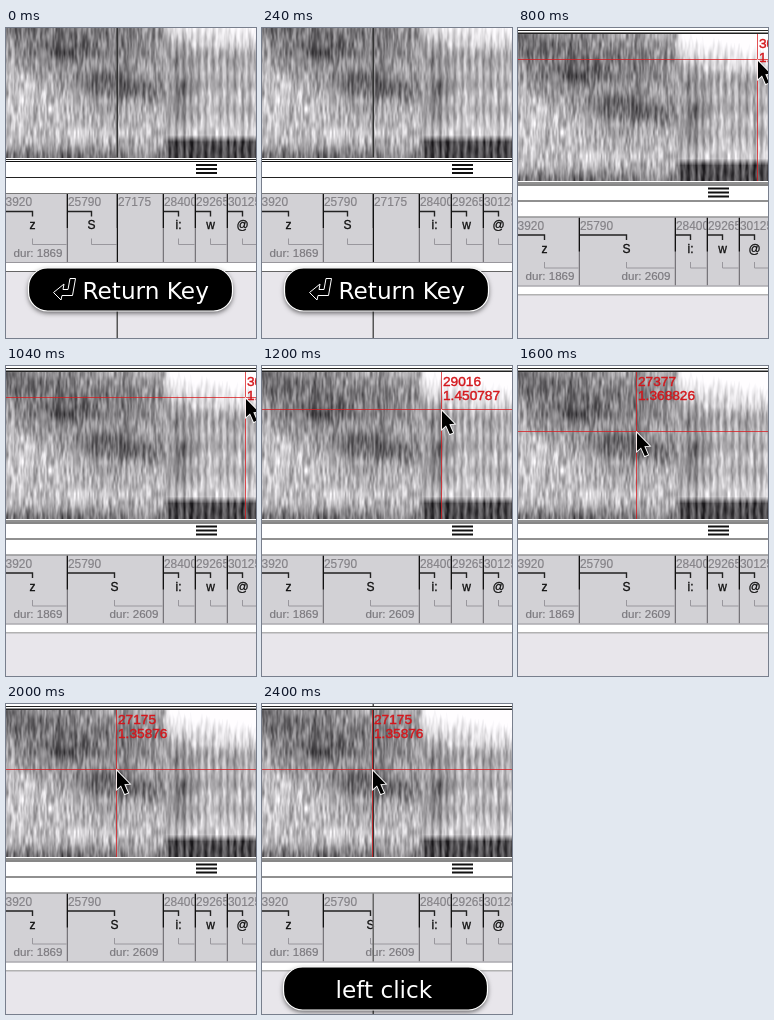
Write an HTML page with a canvas that moves like this. It is 250 by 310 pixels and loops after 2800 ms.

```html
<!DOCTYPE html>
<html lang="en">
<head>
<meta charset="utf-8">
<title>Segment editor</title>
<style>
html, body { margin: 0; width: 250px; height: 310px; overflow: hidden; background: #fff; }
canvas { display: block; }
</style>
</head>
<body>
<canvas id="stage" width="250" height="310"></canvas>
<script>
const W = 250, H = 310, STEP = 400;
const SPEC_TOP = 6, SPEC_BOTTOM = 153;
const SCROLL = -23.5;
const SANS = '"Liberation Sans", Arial, sans-serif';
const ctx = document.getElementById('stage').getContext('2d');

const STEPS = [
  { split: true, line: true, banner: { x: 22.5, y: 240, text: 'Return Key', textX: 78, icon: true } },
  { split: true, line: true },
  { pointer: [239, 31], info: ['30640', '1.532'] },
  { pointer: [179, 43], info: ['29016', '1.450787'] },
  { pointer: [118, 65], info: ['27377', '1.368826'] },
  { pointer: [110, 65], info: ['27175', '1.35876'] },
  { pointer: [110, 65], info: ['27175', '1.35876'], line: true,
    banner: { x: 21.5, y: 263, text: 'left click', textX: 75 } }
];

// start, end, sample number, label, duration
const SEGMENTS = [
  [-8.5, 60.5, '23920', 'z', 'dur: 1869'],
  [60.5, 156.5, '25790', 'S', 'dur: 2609'],
  [156.5, 188.5, '28400', 'i:'],
  [188.5, 220.5, '29265', 'w'],
  [220.5, 251.5, '30125', '@']
];
const SPLIT_SEGMENTS = [
  SEGMENTS[0],
  [60.5, 110.5, '25790', 'S'],
  [110.5, 156.5, '27175', ''],
  ...SEGMENTS.slice(2)
];

// Energy clouds: x, y, radius x, radius y, strength
const FRICATIVE = [
  [40, 25, 80, 32, .18], [10, 15, 30, 20, .12], [55, 47, 28, 12, .24],
  [95, 72, 40, 13, .17], [125, 85, 45, 12, .24], [120, 38, 50, 25, .13],
  [60, 153, 130, 10, .25], [25, 98, 35, 24, -.1], [85, 128, 70, 9, -.08]
];
const VOWEL = [
  [172, 52, 14, 20, .18], [175, 85, 15, 15, .3], [220, 54, 48, 14, .16],
  [218, 79, 45, 10, .14], [172, 110, 16, 16, .2], [225, 105, 35, 10, .1]
];

function rect(x, y, w, h, color) {
  ctx.fillStyle = color;
  ctx.fillRect(x, y, w, h);
}

function text(str, x, y, font, color, align = 'left', weight = 0) {
  ctx.font = font;
  ctx.textAlign = align;
  ctx.fillStyle = ctx.strokeStyle = color;
  ctx.fillText(str, x, y);
  if (weight) {
    ctx.lineWidth = weight;
    ctx.strokeText(str, x, y);
  }
}

function polyline(color, width, points) {
  ctx.strokeStyle = color;
  ctx.lineWidth = width;
  ctx.beginPath();
  points.forEach(([x, y]) => ctx.lineTo(x + .5, y + .5));
  ctx.stroke();
}

function hash(x, y) {
  let n = Math.imul(x, 374761393) + Math.imul(y, 668265263);
  n = Math.imul(n ^ (n >>> 13), 1274126177);
  return ((n ^ (n >>> 16)) >>> 0) / 4294967296;
}

function noise(x, y) {
  const ix = Math.floor(x), iy = Math.floor(y);
  const smooth = t => t * t * (3 - 2 * t);
  const mix = (a, b, t) => a + (b - a) * t;
  const u = smooth(x - ix), v = smooth(y - iy);
  return mix(mix(hash(ix, iy), hash(ix + 1, iy), u),
             mix(hash(ix, iy + 1), hash(ix + 1, iy + 1), u), v);
}

function clouds(list, x, y) {
  return list.reduce((sum, [cx, cy, rx, ry, k]) =>
    sum + k * Math.exp(-(((x - cx) / rx) ** 2) - ((y - cy) / ry) ** 2), 0);
}

const ramp = (a, b, v) => Math.min(1, Math.max(0, (v - a) / (b - a)));

function darkness(x, y) {
  const streak = noise(x / 1.8, y / 8) + noise(x / 1.8 + 90.5, y / 11 + 40.5) - 1;
  const grain = noise(x / 1.3 + 300, y / 4) - .5;
  const voiced = ramp(156, 164, x);
  const hiss = .3 + clouds(FRICATIVE, x, y) + streak * .26 + grain * .08;
  const pulse = Math.cos((x - 163) * 2 * Math.PI / 7.3);
  const onset = ramp(8, 36, y - (x - 160) * .16 + streak * 8);
  const tone = onset * (.19 + clouds(VOWEL, x, y) + pulse * .09 + streak * .16 + grain * .06);
  const base = ramp(130, 137, y) * (.52 + pulse * .03);
  return hiss * (1 - voiced) + (tone + base) * voiced;
}

function makeSpectrogram() {
  const canvas = document.createElement('canvas');
  canvas.width = W;
  canvas.height = SPEC_BOTTOM - SPEC_TOP;
  const c = canvas.getContext('2d');
  const image = c.createImageData(canvas.width, canvas.height);
  for (let y = 0, i = 0; y < canvas.height; y++) {
    for (let x = 0; x < W; x++, i += 4) {
      const level = 255 * (1 - Math.min(.9, Math.max(0, darkness(x, y + SPEC_TOP))));
      image.data[i] = level;
      image.data[i + 1] = level - 2;
      image.data[i + 2] = level + 1;
      image.data[i + 3] = 255;
    }
  }
  c.putImageData(image, 0, 0);
  return canvas;
}

const spectrogram = makeSpectrogram();

function drawSegment([left, right, number, label, duration], selected) {
  const middle = Math.floor((left + right) / 2);
  ctx.save();
  ctx.beginPath();
  ctx.rect(left, 189, right - left, 68);
  ctx.clip();
  text(number, left + 1.5, 201, `11.9px ${SANS}`, '#858388', 'left', .2);
  if (duration) text(duration, right - 4, 251.5, `11.6px ${SANS}`, '#7b797e', 'right', .2);
  if (label) {
    polyline('#222', 1.4, [[left, 206], [middle, 206], [middle, 211]]);
    polyline('#99979d', 1, [[middle, 233], [middle, 239], [right, 239]]);
    text(label, middle + .5, 224, `12px ${SANS}`, '#111', 'center', .3);
  }
  rect(left, 189, 1.5, 68, selected ? '#111' : '#77757a');
  rect(left, 189, 1.5, 34, '#111');
  ctx.restore();
}

function drawPanels({ split, line }) {
  rect(0, 154, W, 1, '#222');
  rect(0, 156, W, 1, '#111');
  rect(0, 172, W, 1, '#222');
  for (const y of [159, 163, 167]) rect(190, y, 21, 2, '#111');

  rect(0, 188, W, 70, '#d2d1d5');
  rect(0, 188, W, 1, '#777');
  rect(0, 257, W, 1, '#99979d');
  for (const segment of split ? SPLIT_SEGMENTS : SEGMENTS)
    drawSegment(segment, split && segment[0] === 110.5);

  rect(0, 266, W, 1, '#666');
  rect(0, 267, W, 133, '#e8e6eb');
  if (line) {
    if (!split) rect(110.5, 189, 1.5, 68, '#666');
    rect(110.5, 267, 1.5, 133, '#555');
  }
}

function drawWindow(step) {
  rect(0, 0, W, 400, '#fff');
  rect(0, 2, W, 1, '#222');
  rect(0, 4.5, W, 1.5, '#222');
  ctx.drawImage(spectrogram, 0, SPEC_TOP);
  if (step.line) {
    rect(110.5, 0, 1.5, 2, '#555');
    rect(110.5, SPEC_TOP, 1.5, SPEC_BOTTOM - SPEC_TOP, '#333');
  }
  ctx.translate(0, .5);
  drawPanels(step);
}

function drawPointer([x, y], info) {
  const red = 'rgba(218, 24, 28, .75)';
  rect(0, y, W, 1, red);
  rect(x, SPEC_TOP, 1, SPEC_BOTTOM - SPEC_TOP, red);
  info.forEach((str, i) =>
    text(str, x + 2, 20 + i * 13.5, `13.7px ${SANS}`, '#d4171c', 'left', .4));

  ctx.save();
  ctx.translate(x + 1, y + 2);
  ctx.beginPath();
  [[0, 0], [0, 18], [4, 14.5], [7.8, 23], [11, 21.7], [7.3, 13.2], [12.5, 12.7]]
    .forEach(([px, py]) => ctx.lineTo(px, py));
  ctx.closePath();
  ctx.lineWidth = 1.8;
  ctx.strokeStyle = '#fff';
  ctx.stroke();
  ctx.fillStyle = '#000';
  ctx.fill();
  ctx.restore();
}

function drawBanner({ x, y, text: caption, textX, icon }) {
  ctx.save();
  ctx.beginPath();
  ctx.roundRect(x, y, 204, 43, 19);
  ctx.shadowColor = 'rgba(0, 0, 0, .6)';
  ctx.shadowBlur = 5;
  ctx.shadowOffsetY = 2;
  ctx.fillStyle = '#000';
  ctx.fill();
  ctx.shadowColor = 'transparent';
  ctx.lineWidth = 1.2;
  ctx.strokeStyle = '#fff';
  ctx.stroke();
  ctx.restore();
  text(caption, textX - 1.5, y + 30.5, '23.2px "DejaVu Sans", sans-serif', '#fff');
  if (icon) {
    ctx.lineWidth = 1;
    ctx.strokeStyle = '#fff';
    ctx.stroke(new Path2D('M47.5 264.5L58 256L57 261.5H62L64 250.5H69.5L66.5 267.5H56L55 272Z'));
  }
}

function drawStep(step) {
  ctx.save();
  if (step.split) ctx.translate(0, SCROLL);
  drawWindow(step);
  ctx.restore();
  if (step.pointer) drawPointer(step.pointer, step.info);
  if (step.banner) drawBanner(step.banner);
}

let start, shown = -1;
function tick(now) {
  start ??= now;
  const index = Math.floor(Math.max(0, now - start) / STEP) % STEPS.length;
  if (index !== shown) drawStep(STEPS[shown = index]);
  requestAnimationFrame(tick);
}
requestAnimationFrame(tick);
</script>
</body>
</html>
```
